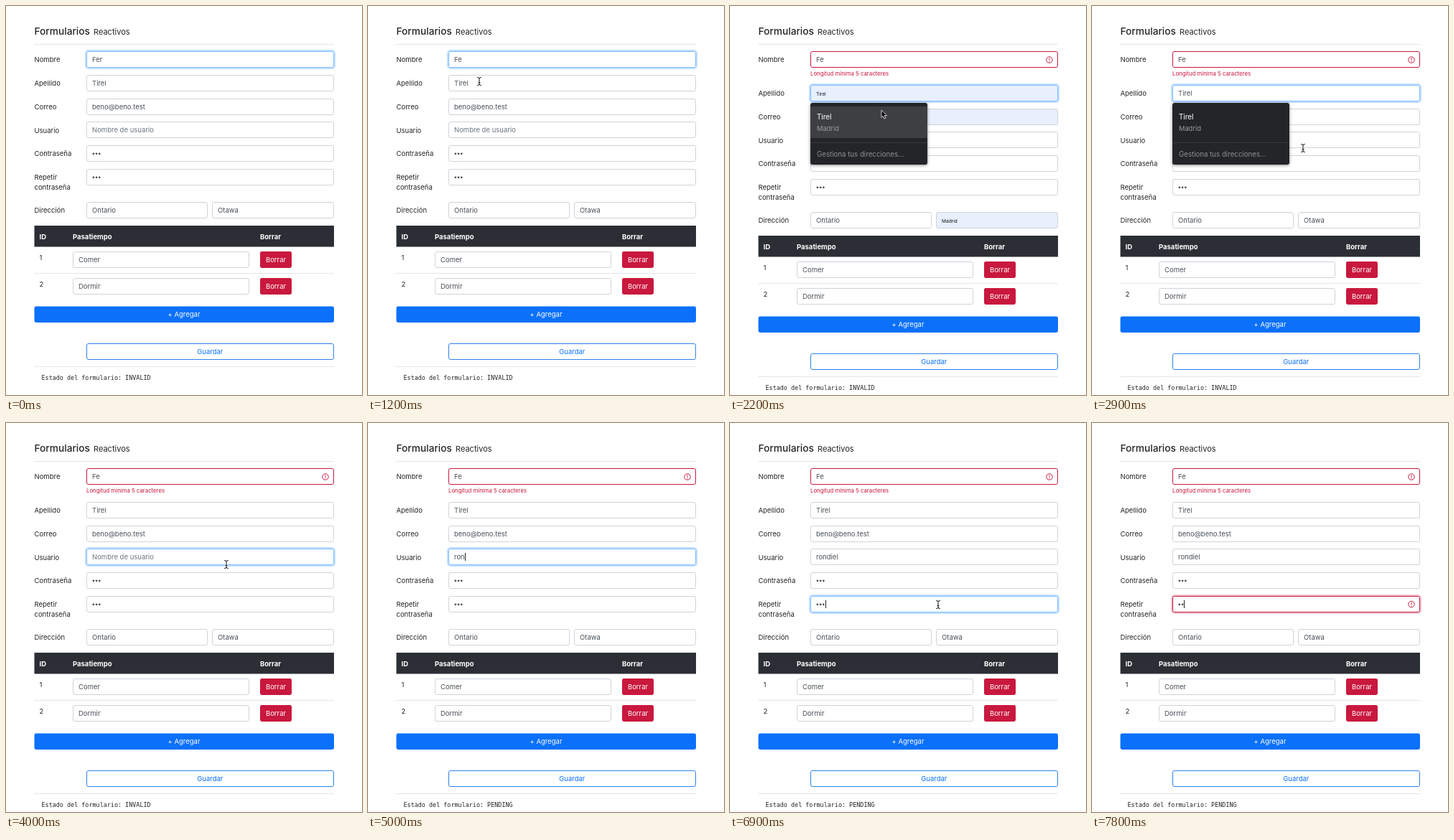
Recreate the animation shown at these times as an HTML page. Size 496 by 542 pixels, loop 8000 ms.

```html
<!DOCTYPE html>
<html lang="es">
<head>
<meta charset="utf-8">
<title>Formularios Reactivos</title>
<style>
  html, body { margin: 0; width: 100%; height: 100%; overflow: hidden; background: #fff; }
  svg { display: block; width: 496px; height: 542px; }
  text { font: 9.5px Inter, sans-serif; fill: #212529; white-space: pre; }
  .title { font-size: 13.7px; font-weight: 500; }
  .sub { font-size: 11px; }
  .value { fill: #495057; }
  .hint { fill: #6c757d; }
  .preview { font-size: 6.6px; fill: #111; }
  .error { font-size: 7.8px; fill: #c9183d; }
  .head { font-weight: 700; fill: #fff; }
  .light { fill: #fff; }
  .blue { fill: #0b70fa; }
  .mid { text-anchor: middle; }
  .mono { font: 8.44px "DejaVu Sans Mono", monospace; fill: #212529; }
  .dot { fill: #495057; }
  .caret { stroke: #222; }
  .rule { stroke: #e3e5e8; }
  .alert { fill: none; stroke: #c9183d; }
  .menu text { font-size: 9.7px; fill: #8e9093; }
  .menu .main { fill: #ececec; font-weight: 500; }
  .menu .second { font-size: 9.3px; fill: #9b9c9f; }
  .panel { fill: #242528; filter: drop-shadow(0 1px 2px rgba(0, 0, 0, .45)); }
</style>
</head>
<body>
<svg id="stage" viewBox="0 0 496 542"></svg>
<script>
const LOOP = 8000, STEP = 100, FADE = 150, SHIFT = -14;
const stage = document.getElementById('stage');

function add(parent, tag, attrs = {}, content) {
  const el = document.createElementNS('http://www.w3.org/2000/svg', tag);
  for (const key in attrs) el.setAttribute(key, attrs[key]);
  if (content !== undefined) el.textContent = content;
  parent.appendChild(el);
  return el;
}
const text = (parent, x, y, content, cls = '') => add(parent, 'text', { x, y, class: cls }, content);
const box = (parent, x, y, width, height, fill, rx = 0) =>
  add(parent, 'rect', { x, y, width, height, fill, rx });
const rule = (parent, y) => add(parent, 'line', { x1: 39, x2: 457, y1: y, y2: y, class: 'rule' });
const show = (el, on) => { el.style.display = on ? '' : 'none'; };

function alertIcon(parent, y) {
  const g = add(parent, 'g', { class: 'alert', transform: `translate(445 ${y})` });
  add(g, 'circle', { r: 4.2 });
  add(g, 'path', { d: 'M0-2.5V.7M0 1.6V2.6' });
  return g;
}

// An input whose middle line lies at y
function field(parent, y, value, { x = 112.5, w = 344, cls = 'value', dots = 0 } = {}) {
  const f = { x: x + 7.5, y };
  f.ring = add(parent, 'rect', { x: x - 1.5, y: y - 12.5, width: w + 3, height: 25, rx: 4, fill: 'none', 'stroke-width': 2 });
  f.frame = add(parent, 'rect', { x, y: y - 11, width: w, height: 22, rx: 2.4, fill: '#fff', stroke: 'rgb(206,212,218)' });
  f.label = text(parent, f.x, y + 3.5, value, cls);
  f.dots = [];
  for (let i = 0; i < dots; i++)
    f.dots.push(add(parent, 'circle', { cx: f.x + 1.9 + i * 4.2, cy: y + .3, r: 1.4, class: 'dot' }));
  return f;
}

// Fixed heading and the first row
text(stage, 39.5, 40, 'Formularios', 'title');
text(stage, 122, 40, 'Reactivos', 'sub');
rule(stage, 53.5);
text(stage, 39.5, 78, 'Nombre');
const fields = { name: field(stage, 74.5, '') };
const nameError = add(stage, 'g');
alertIcon(nameError, 75);
text(nameError, 112, 96.8, 'Longitud mínima 5 caracteres', 'error');

// Everything that is pushed down by the error message
const body = add(stage, 'g');
[['Apellido', 121.5], ['Correo', 154.5], ['Usuario', 187], ['Contraseña', 219.5],
 ['Repetir', 252], ['contraseña', 266.3], ['Dirección', 298.5]]
  .forEach(([label, y]) => text(body, 39.5, y + 3.5, label));

fields.last = field(body, 121.5, '');
fields.mail = field(body, 154.5, 'beno@beno.test');
fields.user = field(body, 186.5, '');
fields.pass = field(body, 219.5, '', { dots: 3 });
fields.again = field(body, 252.5, '', { dots: 3 });
const againIcon = alertIcon(body, 252.5);
field(body, 298.5, 'Ontario', { w: 168 });
fields.city = field(body, 298.5, '', { x: 287.5, w: 169 });

box(body, 39.5, 320, 417.5, 29.5, '#2b2f35');
[[46.5, 'ID'], [93, 'Pasatiempo'], [354, 'Borrar']]
  .forEach(([x, label]) => text(body, x, 338.5, label, 'head'));
['Comer', 'Dormir'].forEach((hobby, i) => {
  const y = 367.5 + i * 37;
  text(body, 46.5, y, i + 1);
  field(body, y, hobby, { x: 93.5, w: 245 });
  box(body, 354, y - 11.5, 44, 23, '#c9183d', 2.4);
  text(body, 376, y + 3.5, 'Borrar', 'light mid');
});
rule(body, 386.5);

box(body, 39.5, 432.5, 417.5, 22.5, '#0b70fa', 2.4);
text(body, 248, 447.3, '+ Agregar', 'light mid');
add(body, 'rect', { x: 112.5, y: 484.5, width: 344, height: 22, rx: 2.4, fill: '#fff', stroke: '#2f82e8' });
text(body, 284.3, 499, 'Guardar', 'blue mid');
rule(body, 516.5);
const status = text(body, 49.5, 535, '', 'mono');

// Autofill menu
const menu = add(stage, 'g', { class: 'menu' });
add(menu, 'rect', { x: 112, y: 135, width: 163, height: 86, rx: 3, class: 'panel' });
const hover = box(menu, 112, 140, 163, 44, '#3e3f42');
add(menu, 'path', { d: 'M112 190.5H275', stroke: '#37383b' });
text(menu, 121, 157.5, 'Tirel', 'main');
text(menu, 121, 173.7, 'Madrid', 'second');
text(menu, 121, 210, 'Gestiona tus direcciones...');

const caret = add(stage, 'line', { class: 'caret' });
const pointer = add(stage, 'g');
const arrow = add(pointer, 'path', {
  d: 'M0 0V10.5L2.4 8.3 4 12 5.8 11.2 4.2 7.6H7.4Z', stroke: '#fff', 'stroke-width': .8 });
const beam = add(pointer, 'g', { fill: 'none' });
const beamPath = 'M-2.8-5.5Q0-5.5 0-4V4Q0 5.5-2.8 5.5M2.8-5.5Q0-5.5 0-4M0 4Q0 5.5 2.8 5.5M-1.5 1.8H1.5';
add(beam, 'path', { d: beamPath, stroke: '#fff', 'stroke-width': 2.4 });
add(beam, 'path', { d: beamPath, stroke: '#111' });

// Border colour, then ring colour with alpha
const looks = {
  idle: [206, 212, 218, 0, 123, 255, 0],
  focus: [128, 189, 255, 0, 123, 255, .25],
  bad: [201, 24, 61, 201, 24, 61, 0],
  badFocus: [201, 24, 61, 201, 24, 61, .25]
};
const lookTracks = {
  name: [[0, 'focus'], [1260, 'bad']],
  last: [[0, 'idle'], [1280, 'focus'], [3080, 'idle']],
  user: [[0, 'idle'], [3080, 'focus'], [6580, 'idle']],
  again: [[0, 'idle'], [6580, 'focus'], [7480, 'badFocus']]
};
const userTrack = [[0, 'Nombre de usuario'], [4700, 'r'], [4800, 'ro'], [5000, 'ron'],
  [5200, 'rond'], [5700, 'rondi'], [5900, 'rondie'], [6000, 'rondiel']];
const caretTrack = [[0, ''], [100, 'name'], [400, ''], [1300, 'last'], [1700, ''], [3200, 'user'],
  [3600, ''], [4100, 'user'], [4500, ''], [4700, 'user'], [6500, ''], [6700, 'again'],
  [7200, ''], [7500, 'again']];
const pointerTrack = [[800, 190, 165], [1200, 155, 105], [1700, 155, 105], [2200, 211, 145],
  [2700, 212, 146], [2900, 294, 198], [3200, 307, 197], [6300, 307, 197], [6600, 290, 253]];

const mix = (a, b, k) => a + (b - a) * k;
const ease = k => k * k * (3 - 2 * k);
const within = (t, from, to) => t >= from && t < to;
const indexAt = (track, t) => Math.max(0, track.findLastIndex(p => p[0] <= t));
const at = (track, t) => track[indexAt(track, t)][1];

function paintField(id, t) {
  const track = lookTracks[id], i = indexAt(track, t);
  const to = looks[track[i][1]], from = looks[track[Math.max(0, i - 1)][1]];
  const k = ease(Math.min(1, (t - track[i][0]) / FADE));
  const c = to.map((v, n) => mix(from[n], v, k));
  fields[id].frame.setAttribute('stroke', `rgb(${c.slice(0, 3)})`);
  fields[id].ring.setAttribute('stroke', `rgba(${c.slice(3)})`);
}

function paintPointer(t) {
  show(pointer, within(t, 800, 4700) || within(t, 6300, 7500));
  const i = indexAt(pointerTrack, t);
  const a = pointerTrack[i], b = pointerTrack[i + 1] || a;
  const k = b === a ? 0 : ease(Math.min(1, Math.max(0, (t - a[0]) / (b[0] - a[0]))));
  pointer.setAttribute('transform', `translate(${mix(a[1], b[1], k)} ${mix(a[2], b[2], k)})`);
  const isArrow = within(t, 1260, 2800);
  show(arrow, isArrow);
  show(beam, !isArrow);
}

function paintCaret(t, top) {
  const id = at(caretTrack, t);
  show(caret, id);
  if (!id) return;
  const f = fields[id];
  const dots = f.dots.filter(d => d.style.display !== 'none').length;
  const empty = id === 'user' && t < 4700;
  const width = dots ? dots * 4.2 : empty ? 0 : f.label.getComputedTextLength();
  const x = Math.round(f.x + width) + .5, y = f.y + (id === 'name' ? 0 : top);
  for (const [key, v] of Object.entries({ x1: x, x2: x, y1: y - 5.5, y2: y + 5.5 })) caret.setAttribute(key, v);
}

function setPreview(f, on, value) {
  f.frame.setAttribute('fill', on ? '#e8f0fe' : '#fff');
  f.label.setAttribute('class', on ? 'preview' : 'value');
  f.label.textContent = value;
}

function paint(t) {
  const touched = t >= 1260, preview = within(t, 1900, 2800), wrong = t >= 7480;
  const top = touched ? 0 : SHIFT;
  body.setAttribute('transform', `translate(0 ${top})`);
  show(nameError, touched);
  show(againIcon, wrong);
  show(fields.again.dots[2], !wrong);
  show(menu, within(t, 1280, 3080));
  show(hover, preview);

  fields.name.label.textContent = t < 200 ? 'Fer' : 'Fe';
  fields.user.label.textContent = at(userTrack, t);
  fields.user.label.setAttribute('class', t < 4700 ? 'hint' : 'value');
  status.textContent = 'Estado del formulario: ' + (t < 4700 ? 'INVALID' : 'PENDING');
  setPreview(fields.last, preview, 'Tirel');
  setPreview(fields.mail, preview, 'beno@beno.test');
  setPreview(fields.city, preview, preview ? 'Madrid' : 'Otawa');

  Object.keys(lookTracks).forEach(id => paintField(id, t));
  paintPointer(t);
  paintCaret(t, top);
}

const start = performance.now();
function tick() {
  const now = (performance.now() - start + 10) % LOOP;
  paint(Math.floor(now / STEP) * STEP);
  requestAnimationFrame(tick);
}
tick();
</script>
</body>
</html>
```
